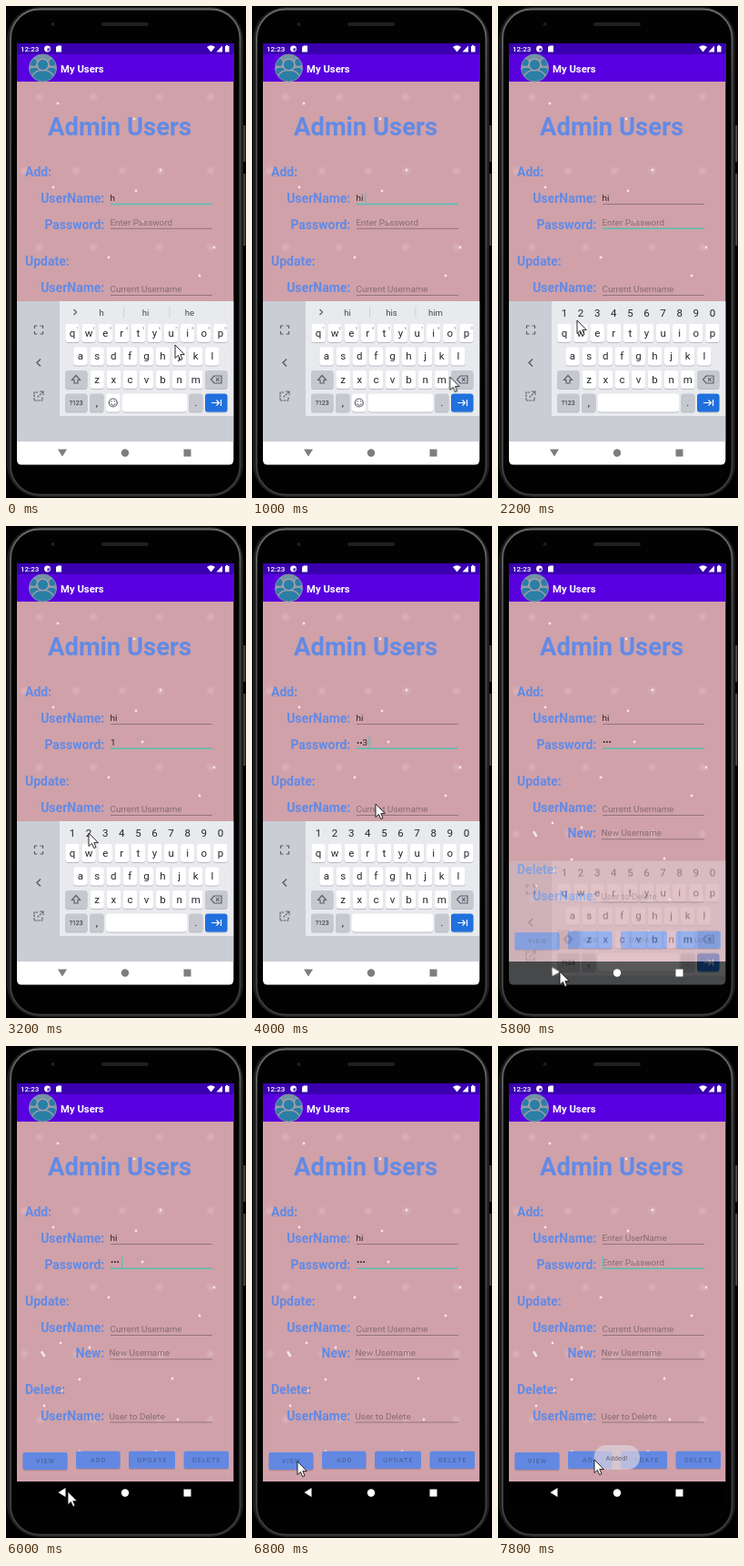
Write an HTML page that moves like this. It is 264x540 px and loops after 8000 ms.

```html
<!DOCTYPE html>
<html lang="en">
<head>
<meta charset="utf-8">
<title>Admin Users</title>
<style>
html, body { margin: 0; width: 100%; height: 100%; overflow: hidden; background: #000; }
svg { display: block; width: 100vw; height: 100vh; font-family: Roboto, sans-serif; }
.label { font-size: 14px; font-weight: 700; fill: #638ae4; }
.field { font-size: 9.8px; fill: #2b2226; }
.hint { font-size: 9.8px; fill: #876b72; }
.line { stroke: #95747b; stroke-width: 1; }
.focus { stroke: #4fc3b9; stroke-width: 1.3; }
.key { font-size: 11.5px; fill: #25272b; text-anchor: middle; }
.small { font-size: 7px; }
.word { font-size: 9.5px; fill: #45484d; text-anchor: middle; }
.icon { fill: none; stroke: #5c6068; stroke-width: 1.2; }
.btn { font-size: 7.2px; font-weight: 500; letter-spacing: 1.1px; fill: #4d659f; text-anchor: middle; }

/* Every state changes on a hard cut within one 8 s loop. */
.anim { animation: 8s step-end infinite; }
@keyframes h { 0% { opacity: 1 } 7.5%, to { opacity: 0 } }
@keyframes hi { 0% { opacity: 0 } 7.5% { opacity: 1 } 95%, to { opacity: 0 } }
@keyframes cleared { 0% { opacity: 0 } 95%, to { opacity: 1 } }
@keyframes before-next { 0% { opacity: 1 } 20%, to { opacity: 0 } }
@keyframes after-next { 0% { opacity: 0 } 20%, to { opacity: 1 } }
@keyframes suggest-hi { 0% { opacity: 0 } 7.5% { opacity: 1 } 20%, to { opacity: 0 } }
@keyframes pass-hint { 0% { opacity: 1 } 35% { opacity: 0 } 95%, to { opacity: 1 } }
@keyframes pass-1 { 0% { opacity: 0 } 35% { opacity: 1 } 42.5%, to { opacity: 0 } }
@keyframes pass-2 { 0% { opacity: 0 } 42.5% { opacity: 1 } 50%, to { opacity: 0 } }
@keyframes pass-3 { 0% { opacity: 0 } 50% { opacity: 1 } 67.5%, to { opacity: 0 } }
@keyframes pass-done { 0% { opacity: 0 } 67.5% { opacity: 1 } 95%, to { opacity: 0 } }
@keyframes caret {
  0% { opacity: 0; transform: translate(124px, 205px) }
  7.5% { opacity: 1; transform: translate(124px, 205px) }
  15% { opacity: 0; transform: translate(124px, 205px) }
  20% { opacity: 1; transform: translate(115px, 231.5px) }
  27.5% { opacity: 0; transform: translate(115px, 231.5px) }
  35% { opacity: 1; transform: translate(121.5px, 231.5px) }
  40% { opacity: 0; transform: translate(121.5px, 231.5px) }
  42.5% { opacity: 1; transform: translate(125px, 231.5px) }
  47.5% { opacity: 0; transform: translate(125px, 231.5px) }
  50% { opacity: 1; transform: translate(128.5px, 231.5px) }
  55% { opacity: 0; transform: translate(128.5px, 231.5px) }
  62.5% { opacity: 1; transform: translate(127px, 231.5px) }
  67.5% { opacity: 0; transform: translate(127px, 231.5px) }
  75% { opacity: 1; transform: translate(127px, 231.5px) }
  80% { opacity: 0; transform: translate(127px, 231.5px) }
  87.5% { opacity: 1; transform: translate(127px, 231.5px) }
  92.5% { opacity: 0; transform: translate(127px, 231.5px) }
  95%, to { opacity: 1; transform: translate(115px, 231.5px) }
}
@keyframes keyboard {
  0% { opacity: 1; transform: none }
  72.5% { opacity: .35; transform: translateY(43.5px) }
  75%, to { opacity: 0; transform: translateY(43.5px) }
}
@keyframes nav { 0% { fill: #7b7d80 } 72.5%, to { fill: #fff } }
@keyframes back { 0% { transform: none } 72.5% { transform: rotate(30deg) } 75%, to { transform: rotate(90deg) } }
@keyframes toast { 0% { opacity: 0 } 97.5%, to { opacity: 1 } }
#pointer { animation: pointer 8s infinite; }
@keyframes pointer {
  0% { transform: translate(186px, 372px); animation-timing-function: steps(2) }
  5%, 7.5% { transform: translate(195px, 357px); animation-timing-function: steps(3) }
  15%, 20% { transform: translate(229px, 432px); animation-timing-function: steps(3) }
  27.5% { transform: translate(87px, 345px); animation-timing-function: steps(1) }
  30%, 35% { transform: translate(73px, 337px); animation-timing-function: steps(2) }
  40%, 42.5% { transform: translate(91px, 337px); animation-timing-function: steps(2) }
  47.5% { transform: translate(109px, 336px); animation-timing-function: steps(1) }
  50%, 52.5% { transform: translate(136px, 305px); animation-timing-function: steps(5) }
  65%, 75% { transform: translate(68px, 489px); animation-timing-function: steps(4) }
  85%, 87.5% { transform: translate(50px, 456px); animation-timing-function: steps(3) }
  95%, to { transform: translate(106px, 454px) }
}
</style>
</head>
<body>
<svg viewBox="0 0 264 540" preserveAspectRatio="none">
  <defs>
    <clipPath id="screen"><path d="M12 41H250.3V498Q250.3 503.5 245 503.5H17Q12 503.5 12 498Z"/></clipPath>
    <clipPath id="round"><circle cx="40.5" cy="68" r="15"/></clipPath>
    <radialGradient id="glow"><stop stop-color="#e3bfc4" stop-opacity=".6"/><stop offset="1" stop-color="#e3bfc4" stop-opacity="0"/></radialGradient>
    <linearGradient id="rim" x2="0" y2="1"><stop stop-color="#6a6a6a"/><stop offset=".15" stop-color="#484848"/><stop offset="1" stop-color="#3c3c3c"/></linearGradient>
  </defs>

  <!-- phone body -->
  <rect width="264" height="540"/>
  <path d="M262.3 131V171M262.3 184V263" stroke="#4c4c4c" stroke-width="2"/>
  <rect x="1" y="1" width="260" height="538" rx="36" fill="#1c1c1c"/>
  <rect x="5" y="3.5" width="252.5" height="533" rx="32" fill="#020202" stroke="url(#rim)" stroke-width="2"/>
  <rect x="105" y="18" width="52" height="4" rx="2" fill="#202020"/>
  <circle cx="51.5" cy="20" r="2" fill="#16202c"/>

  <g clip-path="url(#screen)">
    <rect x="12" y="41" width="239" height="437" fill="#d0a1a9"/>
    <g id="lights"></g>

    <!-- status and title bars -->
    <rect x="12" y="41" width="239" height="12" fill="#3a00b0"/>
    <rect x="12" y="53" width="239" height="30" fill="#5800e0"/>
    <text x="16" y="50" font-size="8" font-weight="500" fill="#fff">12:23</text>
    <g fill="#fff">
      <circle cx="45.5" cy="47" r="3.4"/><path d="M55 45L57 43.5H61V50.5H55Z"/>
      <path d="M221 45Q225.5 41.5 230 45L225.5 50.5ZM231.5 50.5L238 43.5V50.5ZM241 44H242V43H244V44H245.5V50.5H241Z"/>
    </g>
    <path d="M45.5 46.5H48.2Q48 49.2 45.5 49.5Z" fill="#3a00b0"/>
    <g clip-path="url(#round)">
      <rect x="25" y="52" width="32" height="32" fill="#6f94a3"/>
      <g fill="#2a7fa6" stroke="#b3a0aa" stroke-width="1.2">
        <circle cx="30" cy="62" r="4.5"/><circle cx="51" cy="62" r="4.5"/>
        <path d="M22 80Q22 67 31 67T39 80ZM42 80Q42 67 50 67T59 80Z"/>
        <path d="M27 86Q27 70.5 40.5 70.5T54 86Z"/><circle cx="40.5" cy="64.5" r="6.3"/>
      </g>
    </g>
    <circle cx="40.5" cy="68" r="15" fill="none" stroke="#8190ad"/>
    <text x="60" y="73" font-size="11.3" font-weight="700" fill="#fff">My Users</text>

    <!-- form -->
    <text x="46" y="141.5" font-size="27.4" font-weight="700" fill="#638ae4">Admin Users</text>
    <g id="labels" class="label"></g>
    <path class="line" d="M115 217.5H227M115 244.3H227M115 317.5H227M114 343.8H227M114 413H227"/>
    <path class="focus anim" style="animation-name:before-next" d="M115 217.5H227"/>
    <path class="focus anim" style="animation-name:after-next" d="M115 244.3H227"/>
    <g class="hint">
      <text x="114.5" y="314">Current Username</text>
      <text x="113.5" y="340">New Username</text>
      <text x="113.5" y="409.5">User to Delete</text>
      <text class="anim" style="animation-name:cleared" x="114.5" y="214">Enter UserName</text>
      <text class="anim" style="animation-name:pass-hint" x="114.5" y="240.5">Enter Password</text>
    </g>
    <g class="field">
      <text class="anim" style="animation-name:h" x="114.5" y="214">h</text>
      <text class="anim" style="animation-name:hi" x="114.5" y="214">hi</text>
      <text class="anim" style="animation-name:pass-1" x="115" y="240.5">1</text>
      <text class="anim" style="animation-name:pass-2" x="115" y="240.5">•2</text>
      <text class="anim" style="animation-name:pass-3" x="115" y="240.5">••3</text>
      <text class="anim" style="animation-name:pass-done" x="115" y="239.5">•••</text>
    </g>
    <rect class="anim" style="animation-name:caret" width="1.2" height="11.5" fill="#3ccabd"/>
    <g id="buttons"></g>
    <g class="anim" style="animation-name:toast">
      <rect x="105.5" y="438" width="50.5" height="27" rx="13.5" fill="#ddd5e0" opacity=".7"/>
      <text x="130.5" y="454.5" font-size="7.6" text-anchor="middle" fill="#656073">Added!</text>
    </g>

    <!-- keyboard window, including the light navigation strip -->
    <rect x="12" y="478" width="239" height="26"/>
    <g class="anim" style="animation-name:keyboard">
      <rect x="12" y="324" width="239" height="154" fill="#cbcdd5"/>
      <rect x="12" y="478" width="239" height="26" fill="#fff"/>
      <rect x="59" y="324" width="192" height="126" fill="#e8eaee"/>
      <g class="icon">
        <path d="M31.5 354V351H34.5M37.5 351H40.5V354M40.5 357V360H37.5M34.5 360H31.5V357"/>
        <path d="M38 387.5L34 391.5L38 395.5" stroke-width="1.5"/>
        <path d="M35 424H31V433H40V429M37 423H41V427M41 423L34.5 429.5" stroke-dasharray="2.5 .8"/>
      </g>
      <g id="keys"></g>
    </g>
    <g class="anim" style="animation-name:nav">
      <path class="anim" style="animation-name:back;transform-origin:62px 490px" d="M57 486.5H67L62 494.5Z"/>
      <circle cx="131" cy="490.5" r="4.2"/>
      <rect x="195.5" y="486.5" width="8" height="8"/>
    </g>
  </g>

  <path id="pointer" d="M0 0V14.5L3.4 11.4L5.7 16.6L8 15.6L5.8 10.6H10.3Z" fill="#fff" stroke="#111" stroke-width=".9"/>
</svg>
<script>
const fill = (id, html) => { document.getElementById(id).innerHTML = html; };
const text = (x, y, label, cls = "") => `<text x="${x}" y="${y}" class="${cls}">${label}</text>`;
const group = (name, html) => `<g class="anim" style="animation-name:${name}">${html}</g>`;

// Background: rows of soft lights and scattered bright specks
const glowRows = [[37, 96, 169, 225], [20, 77, 128, 170, 225]];
const glows = [100, 181, 265, 338, 410].flatMap((y, row) => glowRows[row % 2].map(x => [x, y]));
const specks = [[57, 107], [141, 124], [170, 180], [52, 199], [143, 203], [150, 237], [229, 265], [113, 276],
  [213, 296], [60, 326], [92, 331], [81, 366], [183, 365], [61, 378], [42, 395], [189, 410], [165, 445], [81, 445]];
fill("lights",
  glows.map(([x, y]) => `<circle cx="${x}" cy="${y}" r="6" fill="url(#glow)"/>`).join("") +
  specks.map(([x, y]) => `<circle cx="${x}" cy="${y}" r="1.4" fill="#f6e5e7"/>`).join("") +
  `<path d="M39.5 336L42 340" stroke="#f6e5e7" stroke-width="2.6" stroke-linecap="round"/>`);

fill("labels",
  [["Add:", 187], ["Update:", 284.5], ["Delete:", 382]].map(([s, y]) => text(21, y, s)).join("") +
  `<g text-anchor="end">` +
  [["UserName:", 216], ["Password:", 245], ["UserName:", 313.5], ["New:", 342], ["UserName:", 411]]
    .map(([s, y]) => text(108.3, y, s)).join("") + `</g>`);

fill("buttons", [["VIEW", 18.5, 49, 446], ["ADD", 77, 48.5, 444.7], ["UPDATE", 135, 51, 444.7], ["DELETE", 195.7, 49.3, 444.7]]
  .map(([s, x, w, y]) =>
    `<rect x="${x}" y="${y + 1.2}" width="${w}" height="19" rx="2" fill="#6d5265" opacity=".3"/>` +
    `<rect x="${x}" y="${y}" width="${w}" height="19" rx="2" fill="#6288e2"/>` +
    text(x + w / 2 + .5, y + 12, s, "btn")).join(""));

// Keyboard
const pitch = 18.1;
const cap = (x, y, w, color = "#fff") =>
  `<rect x="${x}" y="${y - 9}" width="${w}" height="20" rx="3" fill="#b9bcc3"/>` +
  `<rect x="${x}" y="${y - 10}" width="${w}" height="20" rx="3" fill="${color}"/>`;
const row = (letters, x, y) => [...letters].map((c, i) =>
  cap(x + i * pitch - 7.7, y, 15.4) + text(x + i * pitch, y + 3.8, c, "key")).join("");
const digits = (x, y, cls) => [..."1234567890"].map((c, i) => text(x + i * pitch, y, c, cls)).join("");
const words = (a, b, c) => text(105, 339.5, a, "word") + text(153.5, 339.5, b, "word") + text(202, 339.5, c, "word");
const gray = "#c5c8cf";

fill("keys",
  row("qwertyuiop", 73, 359) + row("asdfghjkl", 82, 384.5) + row("zxcvbnm", 100.2, 410) +
  cap(65, 410, 24.5, gray) + cap(219, 410, 24.5, gray) +
  cap(65, 435.5, 24.5, gray) + cap(92, 435.5, 15.5, gray) + cap(201, 435.5, 15.5, gray) +
  cap(219, 435.5, 24.5, "#2070dd") +
  text(77.2, 438, "?123", "key small") + text(99.8, 438.5, ",", "key") + text(208.8, 438.5, ".", "key") +
  `<g class="icon"><path d="M77 405.5L72.5 410.5H75V414H79V410.5H81.5Z"/>
    <path d="M225.5 410L229 406H237V414H229ZM231 408.2L234.6 411.8M234.6 408.2L231 411.8"/>
    <path d="M226 435.5H234M231.5 432.5L234.5 435.5L231.5 438.5M236.5 432V439" stroke="#fff"/></g>` +
  group("before-next",
    cap(110, 435.5, 15.5) + cap(128, 435.5, 71) +
    `<g class="icon"><circle cx="117.8" cy="435.5" r="4.5"/><path d="M115.2 436.5Q117.8 440 120.4 436.5M116 433.3V434.5M119.6 433.3V434.5"/>
      <path d="M74.5 333L77.5 336L74.5 339"/></g>` +
    `<path d="M129.5 330V342M180 330V342" stroke="#cfd2d7"/>` +
    `<g font-size="4" fill="#777">${digits(77.5, 354.5, "")}</g>`) +
  group("h", words("h", "hi", "he")) +
  group("suggest-hi", words("hi", "his", "him")) +
  group("after-next", cap(110, 435.5, 89) + digits(73, 340.8, "key")));
</script>
</body>
</html>
```
